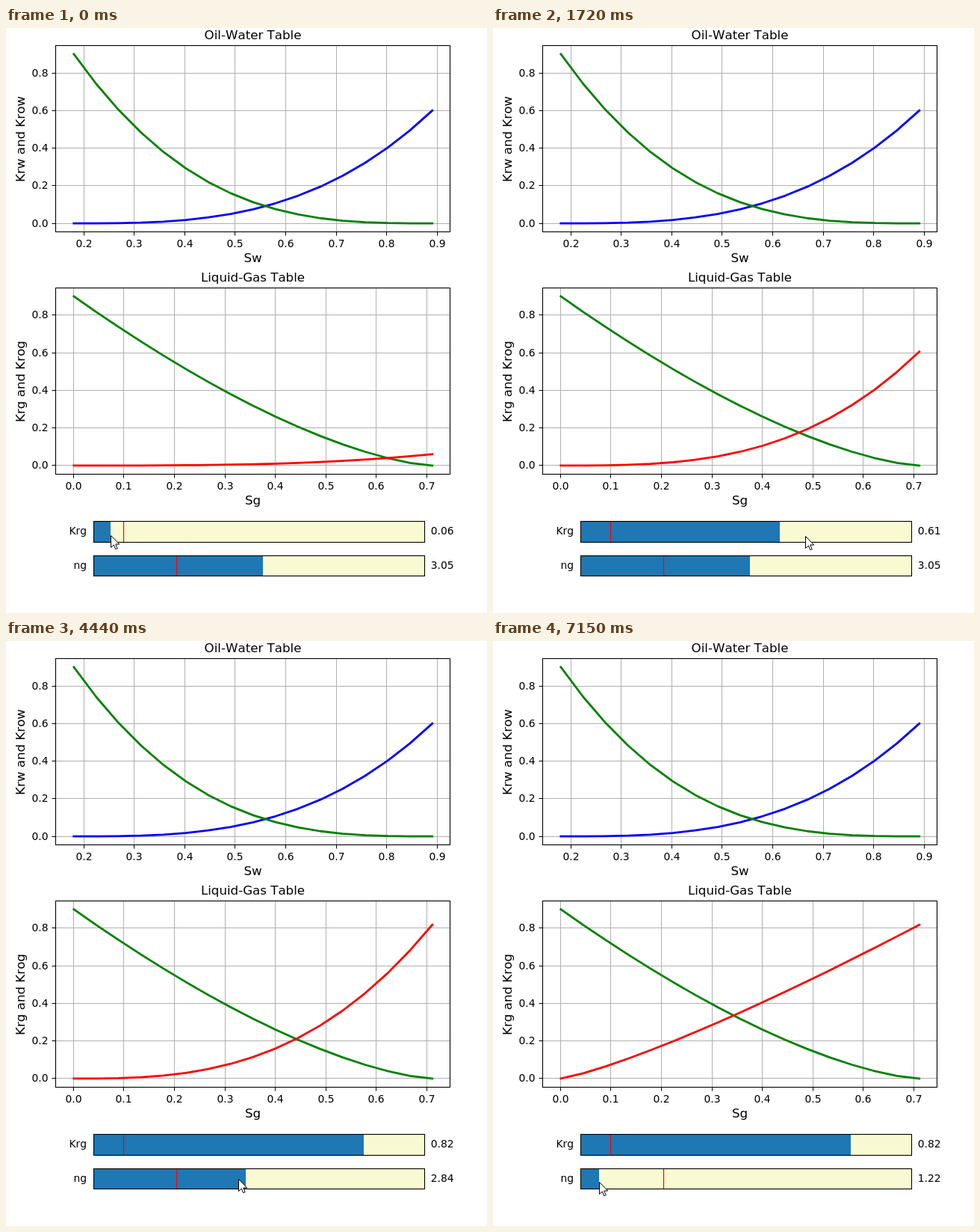
An HTML page for the animation above (8000 ms loop, 644 by 782 pixels).

```html
<!DOCTYPE html>
<html lang="en">
<head>
<meta charset="utf-8">
<title>Relative permeability tables</title>
<style>
  html, body { margin: 0; width: 100%; height: 100%; overflow: hidden; background: #fff; }
  svg { display: block; font: 13.89px "DejaVu Sans", sans-serif; font-kerning: none; }
  .big { font-size: 16.67px; }
  .curve { fill: none; stroke-width: 2.78; stroke-linejoin: round; stroke-linecap: square; }
</style>
</head>
<body>
<svg id="stage" width="644" height="782" viewBox="0 0 644 782"></svg>
<script>
const LOOP = 8000, STEP = 130;
const LEFT = 90.8, SPAN = 480, TICK_X = 67.6, UNIT_Y = 251.4, SEGMENTS = 16;
const ZERO_OIL = 261.15, ZERO_GAS = 584.9;
const BAR_X = 117.5, BAR_W = 443;

// Sliders trail the pointer by LAG steps; each drag has a limit
const LAG = 2, KRG_RELEASE = 20, NG_PRESS = 32, NG_START = 3.046;

// Pointer path: [step, x, y]
const PATH = [[0, 141, 678], [6, 264, 680], [8, 311, 681], [10, 385, 679], [12, 385, 679],
  [14, 452, 678], [18, 480, 679], [20, 480, 679], [23, 375, 754], [24, 296, 740],
  [29, 337, 715], [34, 312, 719], [38, 229, 721], [40, 203, 721], [44, 183.5, 724],
  [45, 168, 725], [49, 160, 724], [53, 143, 723]];

const stage = document.getElementById('stage');
const $ = id => document.getElementById(id);
const crisp = v => Math.floor(v) + .5;

const text = (x, y, s, anchor = 'middle', extra = '') =>
  `<text x="${x}" y="${y}" text-anchor="${anchor}" ${extra}>${s}</text>`;
const line = (x1, y1, x2, y2, color) =>
  `<path d="M${x1} ${y1}L${x2} ${y2}" stroke="${color}"/>`;
const frame = (x, y, w, h) =>
  `<rect x="${x}" y="${y}" width="${w}" height="${h}" fill="none" stroke="#000" stroke-width="1.1"/>`;

function curvePath(zero, f) {
  let d = '';
  for (let i = 0; i <= SEGMENTS; i++) {
    const s = i / SEGMENTS;
    d += (i ? 'L' : 'M') + (LEFT + SPAN * s).toFixed(2) + ' ' + (zero - UNIT_Y * f(s)).toFixed(2);
  }
  return d;
}
const curve = (zero, color, f, id = '') =>
  `<path class="curve" id="${id}" stroke="${color}" d="${curvePath(zero, f)}"/>`;

function chart(top, zero, title, xName, yName, firstX, firstTick) {
  const bottom = top + 249;
  let grid = '', marks = '';
  for (let i = 0; i < 8; i++) {
    const x = crisp(firstX + TICK_X * i);
    grid += line(x, top, x, bottom, '#b0b0b0');
    marks += line(x, bottom, x, bottom + 5, '#000') +
      text(x, bottom + 20.5, (firstTick + i / 10).toFixed(1));
  }
  for (let i = 0; i < 5; i++) {
    const y = crisp(zero - UNIT_Y * i / 5);
    grid += line(66.5, y, 594.5, y, '#b0b0b0');
    marks += line(61.5, y, 66.5, y, '#000') + text(56.5, y + 4.5, (i / 5).toFixed(1), 'end');
  }
  return grid + marks + frame(66.5, top, 528, 249) +
    text(330.5, top - 8.5, title, 'middle', 'class="big"') +
    text(330.5, bottom + 40.5, xName, 'middle', 'class="big"') +
    text(0, 0, yName, 'middle', `class="big" transform="translate(25 ${top + 125})rotate(-90)"`);
}

function slider(id, y, h, markX) {
  return `<rect x="${BAR_X}" y="${y}" width="${BAR_W}" height="${h}" fill="#fafad2"/>
    <rect id="${id}Bar" x="${BAR_X}" y="${y}" height="${h}" fill="#1f77b4"/>
    <path d="M${markX} ${y}v${h}" stroke="#f00" stroke-width="1.2"/>` +
    frame(BAR_X, y, BAR_W, h) +
    text(108, y + 17.5, id, 'end') + text(568.7, y + 17.5, '', 'start', `id="${id}Value"`);
}

stage.innerHTML =
  chart(23.5, ZERO_OIL, 'Oil-Water Table', 'Sw', 'Krw and Krow', 104.05, .2) +
  curve(ZERO_OIL, '#00f', s => .6 * s ** 3) +
  curve(ZERO_OIL, '#008000', s => .9 * (1 - s) ** 3) +
  chart(347.5, ZERO_GAS, 'Liquid-Gas Table', 'Sg', 'Krg and Krog', 90.3, 0) +
  curve(ZERO_GAS, '#008000', s => .9 * (1 - s) ** 1.5) +
  curve(ZERO_GAS, '#f00', s => 0, 'gas') +
  slider('Krg', 659.5, 28, 157.5) + slider('ng', 705.5, 27, 228.5) +
  `<path id="pointer" d="M-.5 .5V16.5L3.3 13L5.8 18.7L8.2 17.7L5.8 12H10.8Z"
    fill="#fff" stroke="#000"/>`;

function pointerAt(step) {
  const next = PATH.findIndex(k => k[0] > step);
  if (next < 0) return PATH[PATH.length - 1].slice(1);
  const a = PATH[Math.max(0, next - 1)], b = PATH[next];
  const p = Math.max(0, (step - a[0]) / (b[0] - a[0]));
  return [a[1] + (b[1] - a[1]) * p, a[2] + (b[2] - a[2]) * p];
}

const dragged = (step, min, max) =>
  min + (max - min) * (pointerAt(step - LAG)[0] - 1 - BAR_X) / BAR_W;

function setSlider(id, value, min, max) {
  const end = Math.round(BAR_X + BAR_W * (value - min) / (max - min));
  $(id + 'Bar').setAttribute('width', end - BAR_X);
  $(id + 'Value').textContent = value.toFixed(2);
}

function draw(now) {
  const step = Math.floor(now % LOOP / STEP);
  const krg = dragged(Math.min(step, KRG_RELEASE + LAG), .01, 1);
  const ng = step < NG_PRESS ? NG_START : dragged(step, 1, 5);
  const [x, y] = pointerAt(step).map(Math.round);
  $('gas').setAttribute('d', curvePath(ZERO_GAS, s => krg * s ** ng));
  setSlider('Krg', krg, .01, 1);
  setSlider('ng', ng, 1, 5);
  $('pointer').setAttribute('transform', `translate(${x} ${y})`);
}

const begin = performance.now();
function tick() {
  draw(performance.now() - begin);
  requestAnimationFrame(tick);
}
tick();
</script>
</body>
</html>
```
